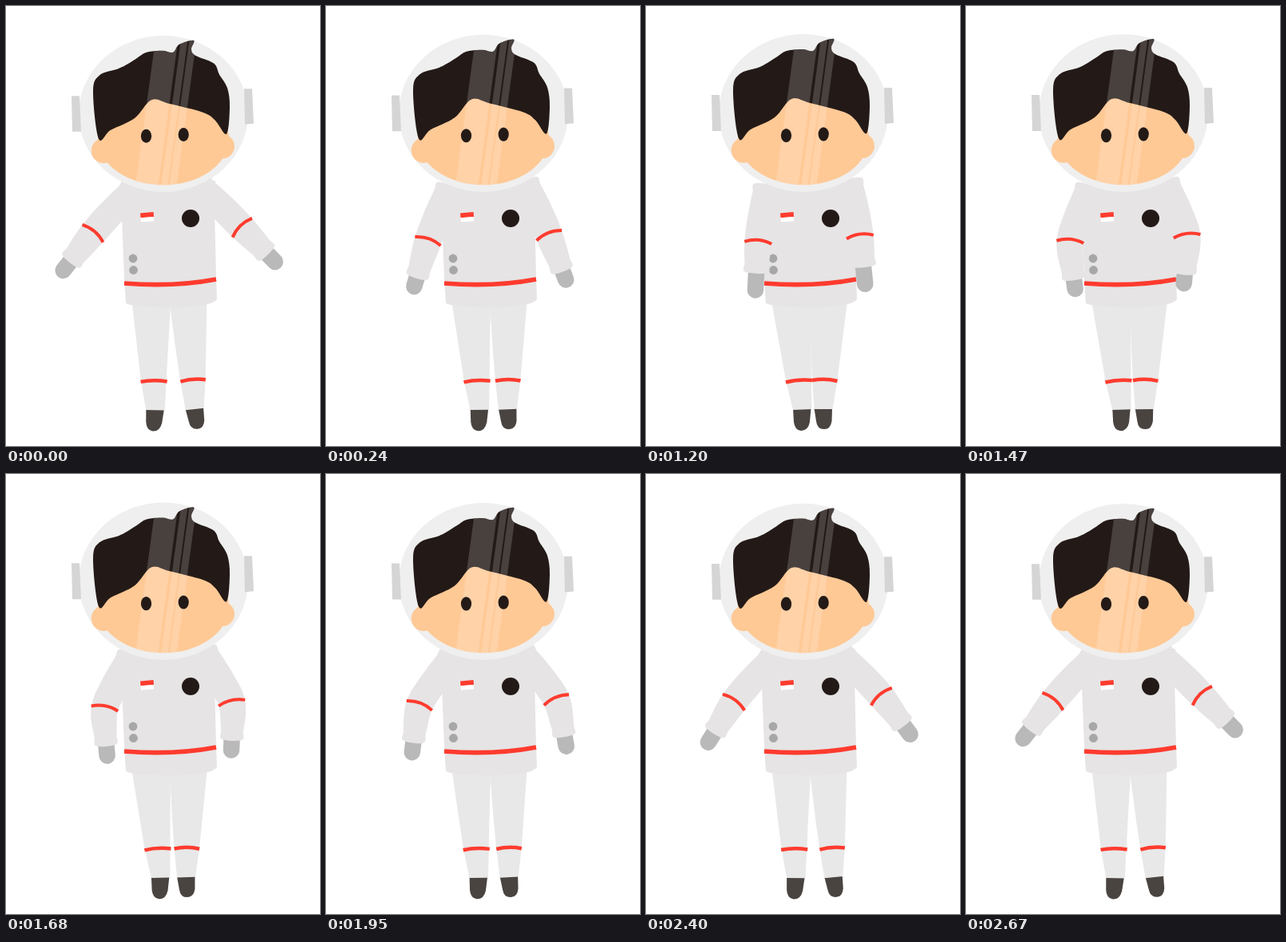
Recreate the animation shown at these times as an HTML page with a canvas. Size 393 by 549 pixels, loop 2.7 s.

```html
<!DOCTYPE html>
<html lang="en">
<head>
<meta charset="utf-8">
<title>Waving astronaut</title>
<style>
  html, body { margin: 0; width: 100%; height: 100%; overflow: hidden; background: #fff; }
  canvas { display: block; width: 393px; height: 549px; }
</style>
</head>
<body>
<canvas id="stage"></canvas>
<script>
const W = 393, H = 549, LOOP = 2700;
const RED = '#fe3b2e', SUIT = '#e6e4e5', LEG = '#e8e8e8', HAND = '#b9b9b9',
      BOOT = '#4a4441', INK = '#231a17', SKIN = '#ffc996', SHELL = '#efefef',
      PAD = '#d5d5d5', BUTTON = '#a7a7a7';

const canvas = document.getElementById('stage');
const ctx = canvas.getContext('2d');
const dpr = window.devicePixelRatio || 1;
canvas.width = W * dpr;
canvas.height = H * dpr;

const clamp = v => Math.min(1, Math.max(0, v));
const smooth = v => { v = clamp(v); return v * v * (3 - 2 * v); };
const mix = (a, b, k) => a + (b - a) * k;
const rad = deg => deg * Math.PI / 180;

// Closed smooth outline through points (Catmull-Rom).
function blob(pts) {
  const path = new Path2D(), n = pts.length;
  path.moveTo(...pts[0]);
  for (let i = 0; i < n; i++) {
    const [a, b, c, d] = [n - 1, 0, 1, 2].map(k => pts[(i + k) % n]);
    path.bezierCurveTo(
      b[0] + (c[0] - a[0]) / 6, b[1] + (c[1] - a[1]) / 6,
      c[0] - (d[0] - b[0]) / 6, c[1] - (d[1] - b[1]) / 6, c[0], c[1]);
  }
  path.closePath();
  return path;
}

function addOval(path, x, y, rx, ry = rx) {
  path.moveTo(x + rx, y);
  path.ellipse(x, y, rx, ry, 0, 0, 2 * Math.PI);
  return path;
}

function fill(color, path) {
  ctx.fillStyle = color;
  ctx.fill(path);
}

const shape = (color, d) => fill(color, new Path2D(d));
const oval = (color, ...size) => fill(color, addOval(new Path2D(), ...size));

function line(color, width, d, cap = 'butt') {
  ctx.strokeStyle = color;
  ctx.lineWidth = width;
  ctx.lineCap = cap;
  ctx.stroke(new Path2D(d));
}

// Crown from the left temple to the right one, then back along the fringe.
const hair = blob([
  [116, 165], [109, 105], [117, 85], [140, 77], [152, 71], [163, 64], [176, 56], [196, 54],
  [209, 56], [217, 46], [235, 41], [232, 52], [237, 60], [260, 70], [267, 84], [277, 101],
  [280, 125], [276, 159], [262, 142], [247, 132], [205, 121], [182, 116], [161, 139], [131, 154]
]);

const face = new Path2D();
addOval(face, 197, 165, 82, 58.3);
addOval(face, 122.5, 180, 15.8);
addOval(face, 270.5, 174.5, 15.5);

// Fills a head shape and lays the visor glare over it.
function glazed(color, path) {
  fill(color, path);
  ctx.save();
  ctx.clip(path);
  for (const [x, w] of [[162, 28.5], [194, 8.5], [204.5, 9]])
    shape('rgba(255,255,255,.17)', `M${x} 224 l25 -184 h${w} l-25 184 Z`);
  ctx.restore();
}

function head(p, eye) {
  ctx.save();
  ctx.translate(0, 2.32 * p);
  ctx.scale(1, 1 - 0.01 * p);
  oval(SHELL, 197, 133.5, 106, 98.5);
  shape(PAD, 'M82 111 H92 L94 156 H83 Z M298 102 H308 L310 146 L299 147 Z');
  glazed(SKIN, face);
  glazed(INK, hair);
  oval(INK, 175.5, 161.5, 6.6 * eye, 8.6 * eye);
  oval(INK, 222.2, 159.8, 6.6 * eye, 8.6 * eye);
  ctx.restore();
}

function leg(hip, degrees, outline, boot, band) {
  ctx.save();
  ctx.translate(hip, 372);
  ctx.rotate(rad(degrees));
  ctx.translate(-hip, -372);
  shape(BOOT, boot);
  shape(LEG, outline);
  line(RED, 4.5, band);
  ctx.restore();
}

function legs(p) {
  leg(181, 3.8 * p,
    'M157 368 H206 L206.5 430 L207.5 503 L184 504 L175 467 Z',
    'M184 502 H206.5 L205 519 Q203 530 194 530 Q186 529 185 519 Z',
    'M175 469.5 Q190 465.5 208 467');
  leg(229, -6.2 * p,
    'M205 368 H252 L239.5 467 L233.5 503 H210.5 L208 467 L206.5 430 Z',
    'M210.5 502 H233 L232.5 518 Q231 528 223 528 Q214 528 213 518 Z',
    'M208 467 Q224 464 239.5 468');
}

// Bends a tapered limb: angle "upper" at the shoulder turns into "lower" past the elbow.
function arm(x, y, side, elbow, upper, lower) {
  const START = -14, spine = [];
  const angle = s => rad(mix(upper, lower, smooth((s - elbow + 18) / 36)));
  let px = x + side * Math.sin(rad(upper)) * START, py = y + Math.cos(rad(upper)) * START;
  for (let s = START; s <= elbow + 70; s++) {
    spine.push([px, py]);
    px += side * Math.sin(angle(s));
    py += Math.cos(angle(s));
  }
  const at = (s, out = 0) => {
    const a = angle(s), [cx, cy] = spine[s - START];
    return [cx + side * Math.cos(a) * out, cy - Math.sin(a) * out];
  };
  const outer = [], inner = [];
  for (let s = -12; s <= elbow + 47; s += 11) {
    const w = 17.2 - 4.5 * ((s - 45) / 62) ** 2;
    outer.push(at(s, w));
    inner.unshift(at(s, -w));
  }
  line(HAND, 20.5, `M${at(elbow + 38)} L${at(elbow + 59)}`, 'round');
  fill(SUIT, blob([...outer, ...inner]));
  line(RED, 4, `M${at(elbow, 17)} Q${at(elbow - 7)} ${at(elbow, -17)}`);
}

// Each shoulder slides inwards as its arm lifts.
function arms(up, low) {
  const elbow = Math.round(mix(61, 64, up));
  arm(148 + 3 * up, 235 + up, -1, elbow, mix(7.5, 41.8, up), mix(3, 38.5, low));
  arm(258 - 7 * up, 228 + 3 * up, 1, elbow, mix(9.5, 44.4, up), mix(6, 44, low));
}

function body() {
  shape(SUIT, 'M146 222 L262 218 L261 255 L263 340 L264 366 Q259 371 252 372 Q205 380 156 373 L150 371 L148 340 L145 265 Z');
  line(RED, 5.7, 'M148 346 Q210 351 263 341');
  shape(RED, 'M168 258.5 L184.5 257 L185 263 L168.5 264.2 Z');
  shape('#fff', 'M168.5 264.2 L185 263 V268.5 L169 269.5 Z');
  oval(INK, 231, 265, 11);
  oval(BUTTON, 159, 315, 5.4);
  oval(BUTTON, 159.5, 329.5, 5.4);
}

// 1 is spread, 0 is at rest; the forearm trails when opening.
function pose(t) {
  if (t < 1200) {
    const p = 1 - smooth(Math.pow(clamp(t / 560), 0.65));
    return { leg: p, upper: p, lower: p };
  }
  const u = clamp((t - 1200) / 1480), v = 1 - u, s = smooth(u);
  return { leg: s, upper: 1 - v * v, lower: s - 3.2 * u * v * v };
}

const pulse = (t, start) => Math.sin(Math.PI * clamp((t - start) / 240));

function draw(t) {
  const p = pose(t);
  ctx.setTransform(dpr, 0, 0, dpr, 0, 0);
  ctx.fillStyle = '#fff';
  ctx.fillRect(0, 0, W, H);
  legs(p.leg);
  body();
  arms(p.upper, p.lower);
  head(p.leg, 1 - 0.27 * (pulse(t, 660) + pulse(t, 2100)));
}

const begin = performance.now();
function tick() {
  draw((performance.now() - begin) % LOOP);
  requestAnimationFrame(tick);
}
tick();
</script>
</body>
</html>
```
